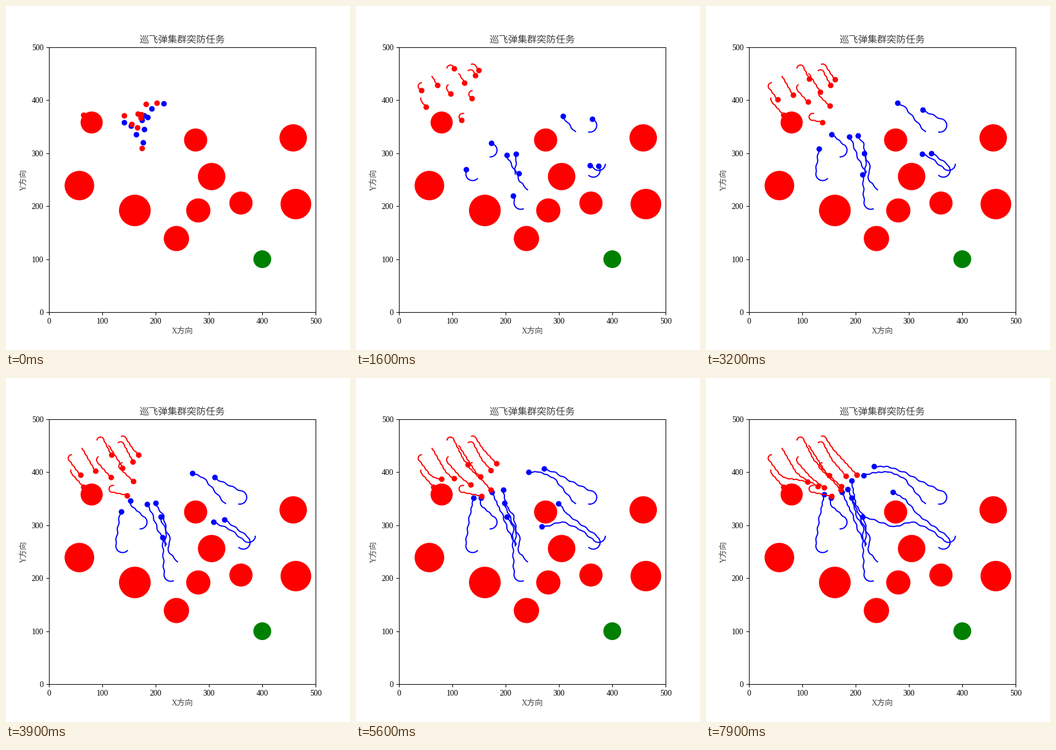
Recreate the animation shown at these times as a matplotlib script. Size 600 by 600 pixels, loop 8000 ms.

```python
import numpy as np
import matplotlib.pyplot as plt
from matplotlib.animation import FuncAnimation

FRAMES, INTERVAL = 80, 100
STEPS = 240             # the whole flight, until every drone is at rest
TURN = 0.2              # largest turn per step, radians
CRUISE, SLOW, RED_SPEED = 2.55, 1.53, 1.33

plt.rcParams["font.family"] = ["Liberation Serif", "Noto Sans CJK JP"]
INK = "0.25"
fig, ax = plt.subplots(figsize=(6, 6), dpi=100)
ax.set(xlim=(0, 500), ylim=(0, 500))
ax.set_title("巡飞弹集群突防任务", color=INK)
ax.set_xlabel("X方向", va="center", color=INK)
ax.set_ylabel("Y方向", va="center", color=INK)
ax.xaxis.set_label_coords(0.5, -0.0725)
ax.yaxis.set_label_coords(-0.0935, 0.5)


def disc(x, y, radius, color="red"):
    ax.add_patch(plt.Circle((x, y), radius, color=color))


def fly(start, heading, goals, speed, phase):
    """Steer from goal to goal with a limited turn rate; rest at the last."""
    pos, angle = np.array(start, float), np.radians(heading)
    goals = [np.array(g, float) for g in goals]
    path = [pos]
    for step in range(1, STEPS):
        v = speed(step)
        gap = goals[0] - pos if goals else None
        while goals and np.hypot(*gap) < 1.5 * v:
            reached = goals.pop(0)
            if goals:
                gap = goals[0] - pos
            else:
                pos = reached
        if goals:
            error = np.angle(np.exp(1j * (np.arctan2(gap[1], gap[0]) - angle)))
            angle += np.clip(error, -TURN, TURN)
            sway = 0.3 * np.sin(2 * np.pi * step / 8 + phase) if abs(error) < TURN else 0
            pos = pos + v * np.array([np.cos(angle + sway), np.sin(angle + sway)])
        path.append(pos)
    return np.array(path)


class Drone:
    def __init__(self, color, start, heading, goals, speed):
        self.path = fly(start, heading, goals, speed, phase=len(drones))
        z = 3 if color == "red" else 2
        self.trail, = ax.plot([], [], color=color, lw=1.5, zorder=z)
        self.dot, = ax.plot([], [], "o", color=color, zorder=z + 0.5)

    def show(self, n):
        # the loop opens on the resting swarm, without trails
        self.trail.set_data(*self.path[:n].T)
        self.dot.set_data(*self.path[n - 1:n or None].T)


def blue(start, heading, slow_from, *goals):
    speed = lambda step: CRUISE if step < slow_from else SLOW
    drones.append(Drone("blue", start, heading, goals, speed))


def red(start, heading, *goals):
    drones.append(Drone("red", start, heading, goals, lambda step: RED_SPEED))


for obstacle in [(80, 358, 20), (57, 239, 27), (161, 192, 29), (275, 325, 21),
                 (305, 256, 25), (280, 192, 22), (239, 139, 23), (360, 206, 21),
                 (458, 329, 25), (463, 204, 28)]:
    disc(*obstacle)
disc(400, 100, 16, "green")

drones = []
blue((331, 341), 130, 31, (289, 391), (262, 401), (231, 399), (215, 394))
blue((356, 340), -15, 60, (312, 388), (288, 402), (260, 411), (235, 411), (178, 371))
blue((387, 279), -90, 90, (342, 291), (306, 307), (274, 297), (220, 315), (176, 320))
blue((356, 258), -47, 59, (315, 321), (292, 350), (270, 363), (179, 345))
blue((171, 293), -6, 17, (153, 338), (154, 352))
blue((220, 264), 122, 29, (203, 293), (194, 320), (174, 363))
blue((218, 261), 100, 31, (220, 290), (214, 321), (200, 339), (192, 384))
blue((241, 231), 155, 43, (225, 248), (228, 272), (209, 312), (192, 354), (185, 368))
blue((147, 252), -130, 40, (132, 316), (141, 358))
blue((233, 195), -153, 59, (213, 275), (215, 298), (202, 314), (192, 353), (163, 336))

red((42, 433), 180, (59, 394), (71, 388), (91, 386), (110, 382), (174, 310))
red((62, 445), -62, (88, 400), (98, 391), (132, 372), (166, 349))
red((90, 461), 85, (122, 422), (152, 392), (167, 375))
red((112, 450), -60, (145, 398), (173, 373))
red((130, 456), 45, (157, 421), (182, 393))
red((136, 468), 25, (158, 443), (202, 395))
red((92, 429), 210, (117, 389), (141, 371))
red((137, 418), 180, (158, 383), (172, 367))
red((41, 404), -110, (65, 372))
red((121, 375), 160, (155, 355))


def update(n):
    for drone in drones:
        drone.show(n)


anim = FuncAnimation(fig, update, frames=FRAMES, interval=INTERVAL, repeat=True,
                     repeat_delay=0, init_func=lambda: update(0))
plt.show()
```
